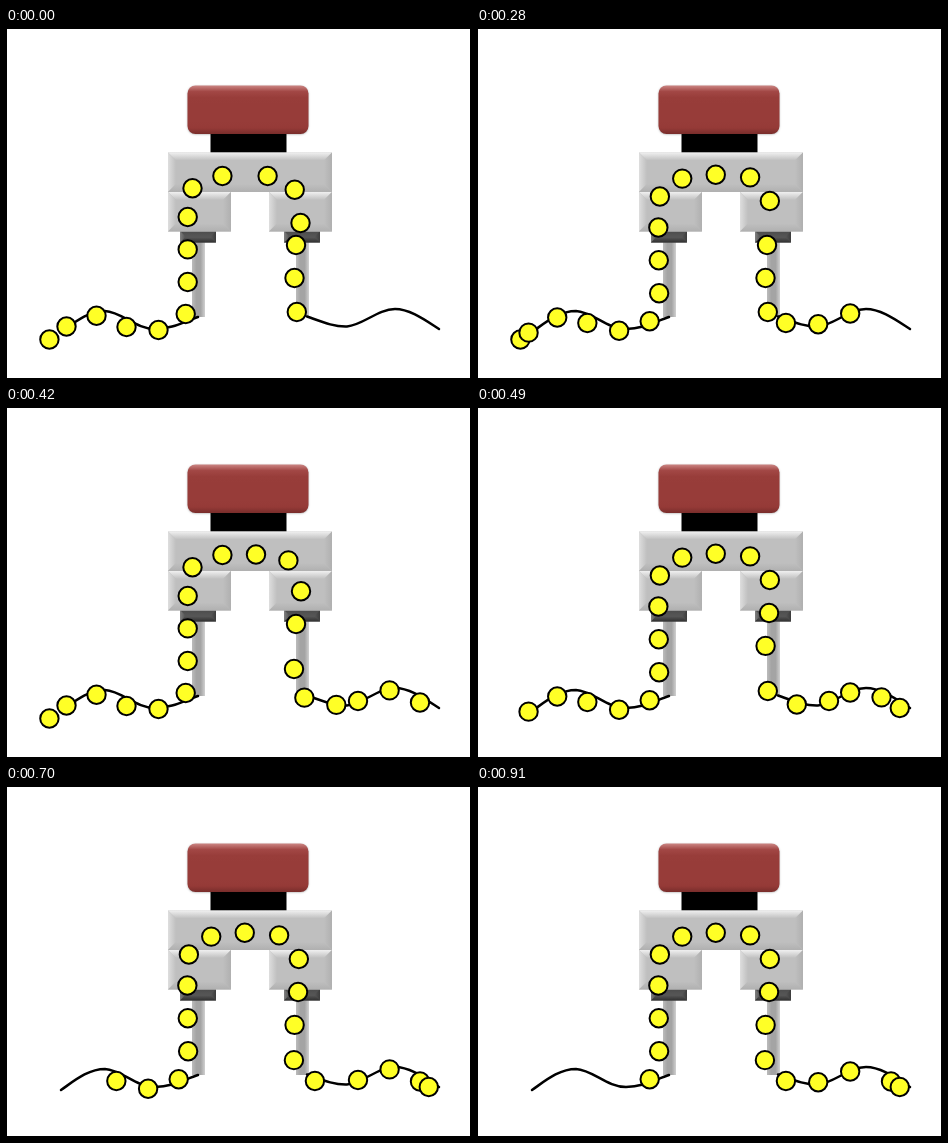
An HTML page with a canvas for the animation above (980 ms loop, 465 by 351 pixels).

```html
<!DOCTYPE html>
<html lang="en">
<head>
<meta charset="utf-8">
<title>Beads through a clamp</title>
<style>
  html, body { margin: 0; width: 100%; height: 100%; overflow: hidden; background: #fff; }
  canvas { display: block; }
</style>
</head>
<body>
<canvas id="stage" width="465" height="351"></canvas>
<script>
const ctx = document.getElementById("stage").getContext("2d");
const LOOP = 980, STEP = 70, LAST = 60, SPACING = 3;

// Key points of the bead route, one per SPACING stations, joined by a smooth spline.
// The outer two only shape the ends; station 0 lies a third of the way into the first span.
const route = [
  [37.8, 316.5], [60.5, 298.5], [90.5, 287.8], [120.5, 299], [152.5, 302],
  [179.7, 286], [181.7, 254], [181.7, 221.4], [181.7, 189], [186.5, 160.3],
  [216.4, 148], [250, 147.5], [282.4, 153.4], [295, 184.3], [290, 217],
  [288.5, 250], [290.8, 284], [319.8, 297.5], [352, 294], [383.6, 283.4],
  [414, 295.5], [436, 311]
];

// Starting stations: evenly spaced, with two irregular gaps near the front.
const beads = Array.from({ length: 21 }, (_, i) =>
  -13 + SPACING * i + (i > 14 ? 1 : 0) - (i > 17 ? 1 : 0));

function spline(a, b, c, d, u) {
  const bend = 2 * a - 5 * b + 4 * c - d, twist = 3 * (b - c) + d - a;
  return b + u / 2 * (c - a + u * (bend + u * twist));
}

function pointAt(station) {
  const pos = (station + 1) / SPACING, i = Math.floor(pos);
  const key = k => route[Math.min(route.length - 1, Math.max(0, k))];
  return [0, 1].map(axis => spline(
    key(i - 1)[axis], key(i)[axis], key(i + 1)[axis], key(i + 2)[axis], pos - i));
}

function polygon(color, ...pts) {
  ctx.fillStyle = color;
  ctx.beginPath();
  pts.forEach(([x, y]) => ctx.lineTo(x, y));
  ctx.fill();
}

function gradient(x0, y0, x1, y1, ...colors) {
  const g = ctx.createLinearGradient(x0, y0, x1, y1);
  colors.forEach((c, i) => g.addColorStop(i / (colors.length - 1), c));
  return g;
}

function bevelBox(x, y, w, h, b, { face, top, left, right, bottom }) {
  const r = x + w, d = y + h;
  ctx.fillStyle = face;
  ctx.fillRect(x, y, w, h);
  polygon(gradient(0, y, 0, y + b, top, face), [x, y], [r, y], [r - b, y + b], [x + b, y + b]);
  polygon(gradient(x, 0, x + b, 0, left, face), [x, y], [x + b, y + b], [x + b, d - b], [x, d]);
  polygon(gradient(r, 0, r - b, 0, right, face), [r, y], [r - b, y + b], [r - b, d - b], [r, d]);
  polygon(gradient(0, d, 0, d - b, bottom, face), [x, d], [r, d], [r - b, d - b], [x + b, d - b]);
}

function redCap() {
  ctx.save();
  ctx.shadowColor = "rgba(0,0,0,.3)";
  ctx.shadowBlur = 2;
  ctx.shadowOffsetY = 0.5;
  ctx.fillStyle = gradient(0, 57.5, 0, 106, "#cc8684", "#a24745", "#983d3a", "#973c39",
    "#973c39", "#973c39", "#973c39", "#953a37", "#792d2b");
  ctx.beginPath();
  ctx.roundRect(181.5, 57.5, 121, 48.5, 8);
  ctx.fill();
  ctx.restore();
}

function thread(x, y, ...curves) {
  ctx.beginPath();
  ctx.moveTo(x, y);
  curves.forEach(c => ctx.bezierCurveTo(...c));
  ctx.stroke();
}

function drawMachine() {
  ctx.fillStyle = "#fff";
  ctx.fillRect(0, 0, 465, 351);
  ctx.strokeStyle = "#000";
  ctx.lineWidth = 1;
  ctx.strokeRect(0.5, 0.5, 464, 350);

  const silver = { face: "#bfbfbf", top: "#f0f0f0", left: "#dedede", right: "#b0b0b0", bottom: "#b0b0b0" };
  const steel = { face: "#555", top: "#4c4c4c", left: "#808080", right: "#3c3c3c", bottom: "#303030" };
  for (const x of [186, 290]) {
    ctx.fillStyle = gradient(x, 0, x + 13, 0, "#bcbcbc", "#a4a4a4", "#a4a4a4", "#d0d0d0");
    ctx.fillRect(x, 213, 13, 76);
  }
  for (const x of [174, 278]) bevelBox(x, 203, 36, 11.5, 5, steel);
  ctx.fillStyle = "#000";
  ctx.fillRect(204.5, 104, 76, 21);
  redCap();
  bevelBox(162, 124.5, 164, 39.5, 8, silver);
  for (const x of [162, 263]) bevelBox(x, 164, 63, 39.5, 8, silver);

  ctx.strokeStyle = "#000";
  ctx.lineWidth = 2.5;
  ctx.lineCap = "round";
  thread(55, 304, [68, 295, 82, 283, 99, 283], [116, 284, 130, 301, 149, 301], [167, 301, 179, 293, 192, 289]);
  thread(301, 288.5, [314, 293, 327, 299, 341, 298.5], [357, 297, 372, 281, 389, 281], [404, 281, 419, 292, 433, 301]);
}

function drawBead([x, y]) {
  ctx.beginPath();
  ctx.arc(x, y, 9.2, 0, Math.PI * 2);
  ctx.fillStyle = "#ffff26";
  ctx.fill();
  ctx.strokeStyle = "#000";
  ctx.lineWidth = 2;
  ctx.stroke();
}

function render(now) {
  const tick = Math.floor((now % LOOP) / STEP);
  const step = tick === 1 ? 0 : tick; // the opening pose holds twice as long
  const stations = beads.map(start => Math.min(LAST, Math.max(0, start + 2 * step)));
  drawMachine();
  new Set(stations).forEach(station => drawBead(pointAt(station)));
}

const began = performance.now();
function loop() {
  render(performance.now() - began);
  requestAnimationFrame(loop);
}
loop();
</script>
</body>
</html>
```
